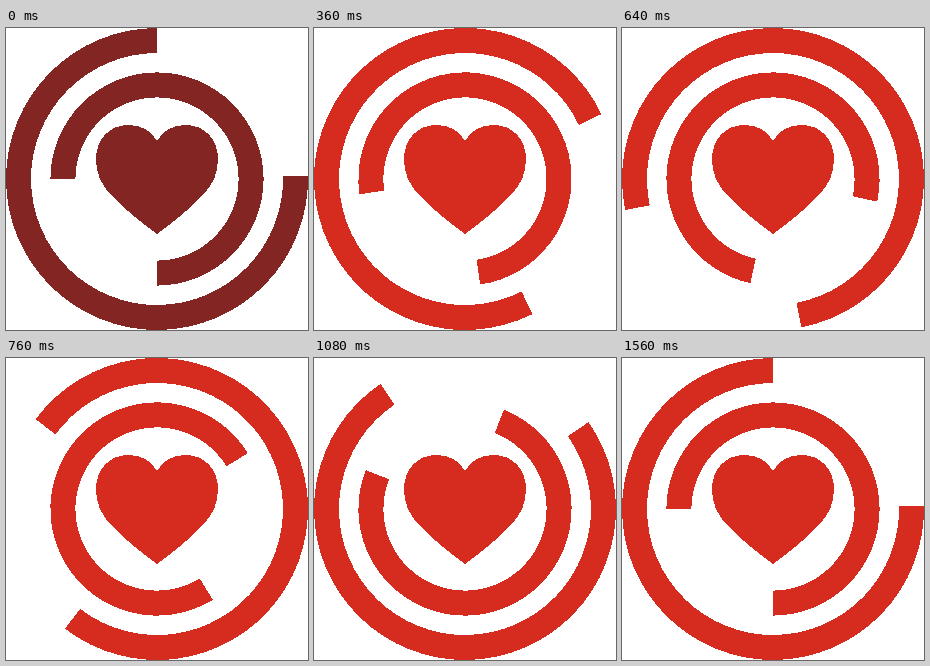
An HTML page that plays this animation: 302 px wide and 302 px high, repeating every 1660 ms.

```html
<!DOCTYPE html>
<html lang="en">
<head>
<meta charset="utf-8">
<title>Heart with turning rings</title>
<style>
  html, body { margin: 0; width: 100%; height: 100%; overflow: hidden; background: #fff; }
  svg { display: block; width: 100%; height: 100%; }
</style>
</head>
<body>
<svg id="stage" viewBox="0 0 302 302" fill="#d62b1f" stroke="none" shape-rendering="crispEdges">
  <path id="outer"/>
  <path id="inner"/>
  <path d="M151 113C145 102 135 97 122 97C103 97 90 112 90 131C90 145 95 156 104 166C118 181 136 195 151 206C166 195 184 181 198 166C207 156 212 145 212 131C212 112 199 97 180 97C167 97 157 102 151 113Z"/>
</svg>
<script>
const LOOP = 1660, STEP = 40, LAST = 39;
const TURN = 4000 / 3;      // duration of one full turn
const INNER_DELAY = 240;
const C = 151;
const RED = '#d62b1f', DARK = '#832522';

const stage = document.getElementById('stage');
const outer = document.getElementById('outer');
const inner = document.getElementById('inner');

// Angles are in degrees, clockwise from twelve o'clock.
function point(r, deg, shift = 0) {
  const a = deg * Math.PI / 180 - Math.asin(shift / r);
  return (C + r * Math.sin(a)).toFixed(3) + ' ' + (C - r * Math.cos(a)).toFixed(3);
}

// "extra" lengthens the start of the ring by that many pixels, keeping its edge parallel.
function ring(r1, r2, from, to, extra = 0) {
  return `M${point(r2, from, extra)}A${r2} ${r2} 0 1 1 ${point(r2, to)}` +
         `L${point(r1, to)}A${r1} ${r1} 0 1 0 ${point(r1, from, extra)}Z`;
}

function ease(x) {
  const t = Math.min(1, Math.max(0, x));
  return t * t * (3 - 2 * t);
}

outer.setAttribute('d', ring(126, 151, 90, 360, 2.8));
inner.setAttribute('d', ring(81.6, 106.6, 270, 540));

function rotate(el, deg) {
  el.setAttribute('transform', `rotate(${deg.toFixed(3)} ${C} ${C})`);
}

function draw(ms) {
  const step = Math.min(LAST, Math.floor((ms % LOOP) / STEP));
  const t = step * STEP;
  rotate(outer, 360 * ease(t / TURN));
  rotate(inner, -360 * ease((t - INNER_DELAY) / TURN));
  stage.setAttribute('fill', step === 0 ? DARK : RED);
}

let start = null;
function tick() {
  const now = performance.now();
  if (start === null) start = now;
  draw(now - start);
  requestAnimationFrame(tick);
}

draw(0);
requestAnimationFrame(tick);
</script>
</body>
</html>
```
